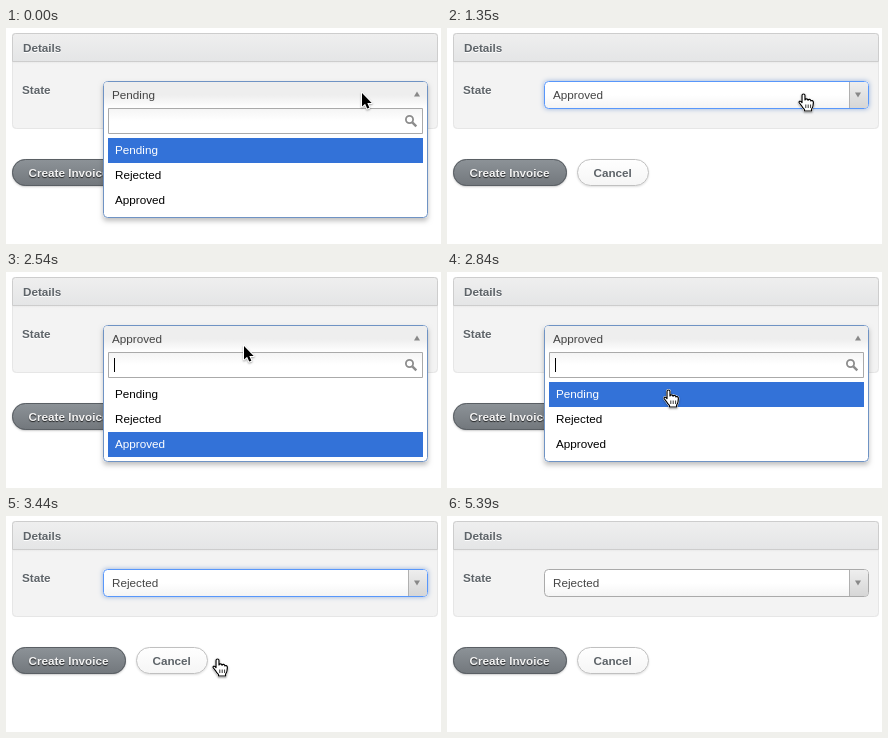
An HTML page with a canvas for the animation above (5490 ms loop, 435x216 px).

```html
<!DOCTYPE html>
<html lang="en">
<head>
<meta charset="utf-8">
<title>Searchable select</title>
<style>
html, body { margin: 0; width: 100%; height: 100%; overflow: hidden; background: #fff; }
canvas { display: block; width: 435px; height: 216px; }
</style>
</head>
<body>
<canvas id="stage" width="435" height="216"></canvas>
<script>
const ctx = document.getElementById('stage').getContext('2d');
const LOOP = 5490;
const OPTIONS = ['Pending', 'Rejected', 'Approved'];
const FACE = '"Liberation Sans", Arial, sans-serif';
const SIZE = 11.7;

// Each step changes only the listed parts of the state.
const STEPS = [
  [0, { open: true, focus: true, value: 'Pending', active: 'Pending', query: '', caret: false, cursor: 'arrow', x: 356, y: 65 }],
  [300, { caret: true }],
  [600, { query: 'a', active: 'Approved' }],
  [750, { query: 'ap' }],
  [900, { query: 'app' }],
  [1350, { open: false, value: 'Approved', query: '', cursor: 'hand' }],
  [2100, { x: 238, y: 74 }],
  [2540, { open: true, cursor: 'arrow' }],
  [2840, { active: 'Pending', cursor: 'hand', x: 221, y: 117 }],
  [2990, { active: 'Rejected', x: 211, y: 142 }],
  [3440, { open: false, value: 'Rejected' }],
  [3740, { cursor: 'arrow' }],
  [4340, { cursor: null }],
  [5390, { focus: false }]
];

const ARROW = new Path2D('M0 0V13.6L3.1 10.7L5.2 15.6L7.4 14.7L5.3 9.9H9.7Z');
const HAND = new Path2D(
  'M-1 9.5V2.5Q-1 1 .5 1Q2 1 2 2.5V7Q2.2 5.8 3.5 5.9Q4.8 6 5 7.2' +
  'Q5.4 6.2 6.6 6.4Q7.8 6.6 7.9 8Q8.3 7.3 9.3 7.6Q10.5 8 10.4 9.6L10 13' +
  'Q9.7 14.6 8.6 16V18H1.6L1.4 16.4Q-.5 14.8 -1.6 12.6L-3.6 10' +
  'Q-4.4 8.8 -3.4 8.2Q-2.4 7.8 -1 9.5Z');
const FINGERS = new Path2D('M2.8 11.5V15M5.2 11.5V15M7.6 11.5V15');

function stateAt(t) {
  const state = {};
  for (const [at, change] of STEPS) if (t >= at) Object.assign(state, change);
  return state;
}

function shade(top, bottom, ...stops) {
  const g = ctx.createLinearGradient(0, top, 0, bottom);
  stops.forEach((c, i) => g.addColorStop(i / (stops.length - 1), c));
  return g;
}

function shadow(color, blur = 0, dy = 0) {
  ctx.shadowColor = color;
  ctx.shadowBlur = blur;
  ctx.shadowOffsetY = dy;
}

function noShadow() { shadow('transparent'); }

function rect(x, y, w, h, fill) {
  ctx.fillStyle = fill;
  ctx.fillRect(x, y, w, h);
}

// Filled box with a crisp one pixel border inside its bounds.
function box(x, y, w, h, r, fill, border) {
  ctx.beginPath();
  ctx.roundRect(x, y, w, h, r);
  ctx.fillStyle = fill;
  ctx.fill();
  noShadow();
  if (!border) return;
  ctx.beginPath();
  ctx.roundRect(x + 0.5, y + 0.5, w - 1, h - 1, r);
  ctx.strokeStyle = border;
  ctx.lineWidth = 1;
  ctx.stroke();
}

function text(str, x, y, color, bold) {
  ctx.font = `${bold ? 'bold ' : ''}${SIZE}px ${FACE}`;
  ctx.fillStyle = color;
  ctx.fillText(str, x, y);
  noShadow();
  return ctx.measureText(str).width;
}

function triangle(x, y, dir) {
  ctx.beginPath();
  ctx.moveTo(x - 3, y - 2.5 * dir);
  ctx.lineTo(x + 3, y - 2.5 * dir);
  ctx.lineTo(x, y + 2.5 * dir);
  ctx.fillStyle = '#888';
  ctx.fill();
}

function drawPage() {
  rect(0, 0, 435, 216, '#fff');
  box(6, 5, 426, 96, 4, '#f3f3f3', '#e6e6e6');
  rect(7, 33, 424, 3, shade(33, 36, '#e6e6e6', '#f3f3f3'));
  box(6, 5, 426, 29, [3, 3, 0, 0], shade(5, 34, '#efefef', '#e4e5e6'), '#cdcdcd');
  shadow('#fff', 0, 1);
  text('Details', 17, 24, '#5e6469', true);
  shadow('#fff', 0, 1);
  text('State', 16, 66, '#5e6469', true);

  shadow('rgba(0,0,0,.2)', 2, 1);
  box(6, 131, 114, 27, 13.5, shade(131, 158, '#8d9398', '#72777c'), '#5a5f64');
  shadow('rgba(0,0,0,.75)', 1, 1);
  text('Create Invoice', 22.5, 149, '#f2f2f2', true);

  shadow('rgba(0,0,0,.12)', 2, 1);
  box(130, 131, 72, 27, 13.5, shade(131, 158, '#fff', '#f5f5f5'), '#c0c0c0');
  text('Cancel', 146.5, 149, '#5e6469', true);
}

function drawClosed(s) {
  if (s.focus) shadow('rgba(60,110,190,.5)', 5);
  box(97, 53, 325, 28, 4, shade(53, 81, '#fff', '#fff', '#f3f3f3'), s.focus ? '#5897fb' : '#aaa');
  box(402, 54, 19, 26, [0, 3, 3, 0], shade(54, 80, '#eee', '#d6d6d6'));
  rect(402, 54, 1, 26, '#b0b0b0');
  triangle(411, 67, 1);
  text(s.value, 106, 71, '#444');
}

function drawSearch(s) {
  box(102, 80, 315, 26, 0, shade(80, 106, '#f4f4f4', '#fff', '#fff'), '#aaa');
  ctx.strokeStyle = '#8c8c8c';
  ctx.lineWidth = 1.8;
  ctx.beginPath();
  ctx.arc(403.5, 91.5, 3.6, 0, Math.PI * 2);
  ctx.stroke();
  ctx.lineWidth = 2.4;
  ctx.beginPath();
  ctx.moveTo(406.3, 94.3);
  ctx.lineTo(410.3, 98.3);
  ctx.stroke();
  const w = text(s.query, 108, 97, '#000');
  if (s.caret) rect(Math.floor(108 + w), 86, 1, 14, '#000');
}

function drawOpen(s) {
  const rows = OPTIONS.filter(o => o.toLowerCase().startsWith(s.query));
  const bottom = 114 + rows.length * 25;
  shadow('rgba(0,0,0,.25)', 5, 3);
  box(97, 53, 325, bottom + 1 - 53, 4, '#fff', '#6f93c4');
  box(98, 54, 323, 26, [3, 3, 0, 0], shade(54, 80, '#eee', '#eee', '#fff'));
  triangle(411, 66, -1);
  text(s.value, 106, 71, '#444');
  drawSearch(s);
  rows.forEach((row, i) => {
    const y = 110 + i * 25;
    const on = row === s.active;
    if (on) rect(102, y, 315, 25, '#3372d8');
    text(row, 109, y + 16, on ? '#fff' : '#000');
    const match = ctx.measureText(row.slice(0, s.query.length)).width;
    if (match) rect(109, y + 17, match, 1, '#fff');
  });
}

function drawCursor(s) {
  if (!s.cursor) return;
  const hand = s.cursor === 'hand';
  const shape = hand ? HAND : ARROW;
  ctx.save();
  ctx.translate(s.x, s.y);
  ctx.lineJoin = 'round';
  shadow('rgba(0,0,0,.35)', 2, 1);
  ctx.strokeStyle = '#fff';
  ctx.lineWidth = 2;
  ctx.stroke(shape);
  noShadow();
  ctx.fillStyle = hand ? '#fff' : '#000';
  ctx.fill(shape);
  if (hand) {
    ctx.strokeStyle = '#000';
    ctx.lineWidth = 1.2;
    ctx.stroke(shape);
    ctx.lineWidth = 0.8;
    ctx.stroke(FINGERS);
  }
  ctx.restore();
}

const start = performance.now();

function draw() {
  const s = stateAt((performance.now() - start) % LOOP);
  drawPage();
  (s.open ? drawOpen : drawClosed)(s);
  drawCursor(s);
  requestAnimationFrame(draw);
}
draw();
</script>
</body>
</html>
```
